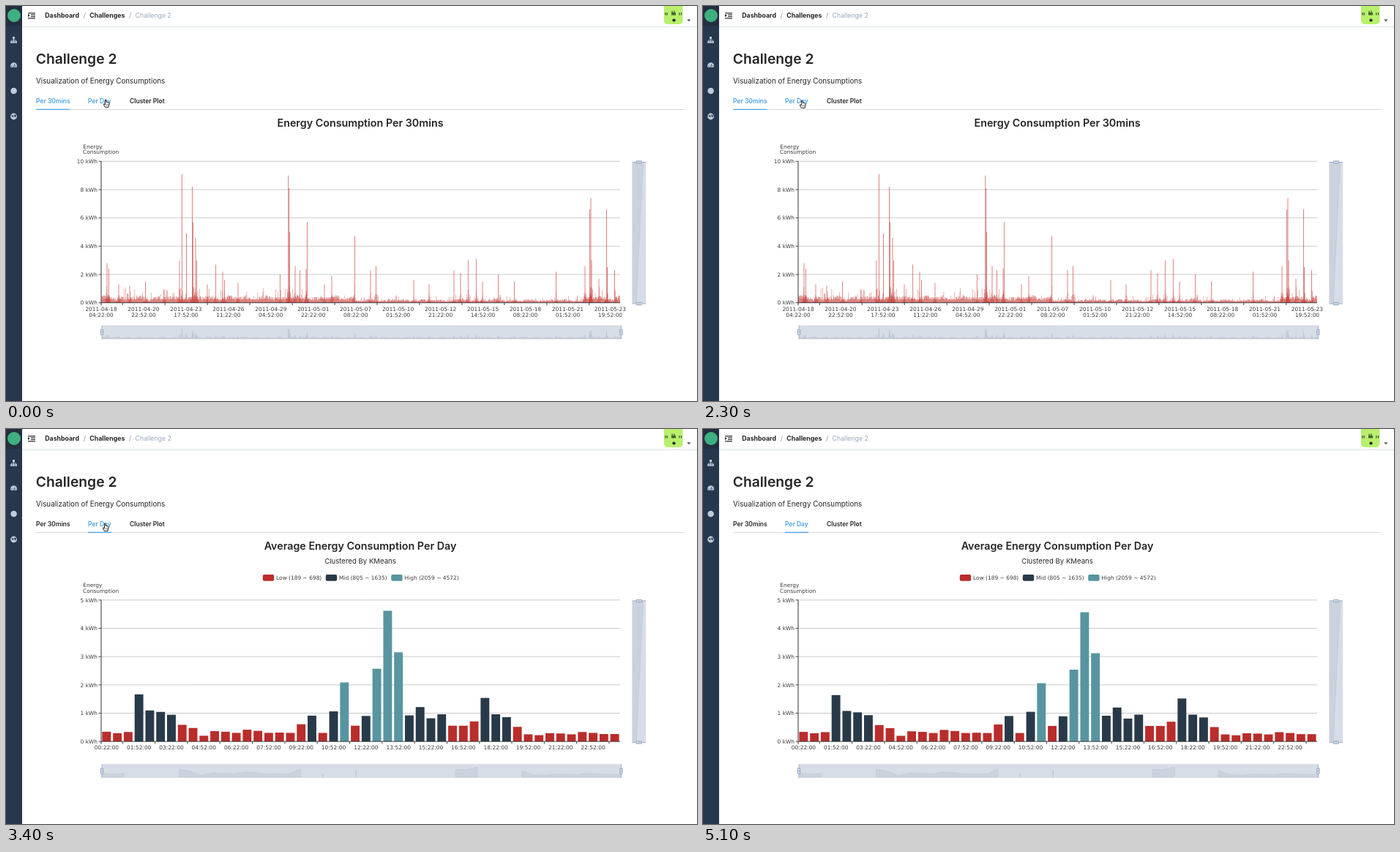
Animation, 944 px wide and 540 px high, one loop 5.2 s. Source, as an HTML page with a canvas:

```html
<!DOCTYPE html>
<html lang="en">
<head>
<meta charset="utf-8">
<title>Energy dashboard</title>
<style>
html, body { margin: 0; width: 100%; height: 100%; overflow: hidden; background: #fff; }
canvas { display: block; width: 944px; height: 540px; }
</style>
</head>
<body>
<canvas id="stage"></canvas>
<script>
const W = 944, H = 540, LOOP = 5200, STEP = 100, SWITCH = 2900;
const UI = 'Inter, sans-serif', CHART = '"DejaVu Sans", sans-serif';
const INK = '#262626', BLUE = '#4ba3e8', ICON = '#bfcbd9';
const LOW = '#b92d2b', MID = '#283a49', HIGH = '#5795a0';
const LEFT = 130, RIGHT = 839;

const canvas = document.getElementById('stage');
const ctx = canvas.getContext('2d');
const dpr = window.devicePixelRatio || 1;
canvas.width = W * dpr;
canvas.height = H * dpr;

// Mean load per half hour, in kWh
const dayLoad = [
  .34, .29, .33, 1.64, 1.08, 1.03, .93, .58, .47, .2, .36, .34,
  .3, .41, .37, .3, .31, .3, .6, .9, .3, 1.05, 2.06, .55,
  .89, 2.54, 4.57, 3.12, .91, 1.2, .81, .95, .55, .55, .7, 1.52,
  .95, .85, .51, .25, .22, .29, .28, .25, .33, .3, .26, .26];

// Position and height of the tallest readings
const peaks = [
  [138, 2.8], [140.3, 2.4], [154, 1.3], [169, 1.2], [190.5, 1.5], [216, .9],
  [237, 3], [240.3, 9.1], [246.5, 4.9], [254.6, 8.2], [255.6, 5.7], [259, 4.6],
  [260.4, 3], [275, 1.3], [286.7, 2.7], [296, 2.2], [298.5, 1.6], [317, 1.4],
  [374.3, 2], [385.8, 9], [386.8, 8.1], [387.6, 5], [395, 2.6], [401.5, 2.3],
  [410, 2.4], [411.5, 5.7], [435, 1.3], [445, 1.9], [476.6, 4.7], [498, 2.3],
  [505.6, 2.6], [557, 1.6], [578, 1.3], [612, 2.3], [621, 2.1], [631.3, 3],
  [642.3, 3.1], [651, 1.5], [672.4, 2], [694.5, 1.5], [751.4, 2.2], [791, 2.6],
  [797.4, 6.6], [799, 7.4], [800, 3], [810, 1.7], [820.4, 6.6], [821.5, 2.5], [831.6, 2.3]];

function seeded(seed) {
  return () => (seed = (seed * 16807) % 2147483647) / 2147483647;
}

// Low background readings with occasional bursts
function makeNoise() {
  const rnd = seeded(4711), out = [];
  for (let x = LEFT + .3; x < RIGHT; x += .45) {
    const level = x < 475 || x > 790 ? 1 : .5;
    const wave = .75 + .25 * Math.sin(x / 5) * Math.sin(x / 17);
    let v = level * wave * (.2 + .4 * rnd());
    if (rnd() < .07) v += level * .75 * rnd();
    out.push([x, v]);
  }
  for (const [px, pv] of peaks)
    for (let d = -3; d <= 3; d += .9)
      out.push([px + d, Math.min(1.5, pv * .45) * rnd() * (1 - Math.abs(d) / 4)]);
  return out;
}
const noise = makeNoise();

function rect(x, y, w, h, fill, r = 0) {
  ctx.fillStyle = fill;
  ctx.beginPath();
  ctx.roundRect(x, y, w, h, r);
  ctx.fill();
}

function disc(x, y, r, fill) {
  ctx.fillStyle = fill;
  ctx.beginPath();
  ctx.arc(x, y, r, 0, 7);
  ctx.fill();
}

function path(points, stroke, width = 1, fill) {
  ctx.beginPath();
  points.forEach(([x, y]) => ctx.lineTo(x, y));
  if (fill) {
    ctx.closePath();
    ctx.fillStyle = fill;
    ctx.fill();
  }
  if (stroke) {
    ctx.strokeStyle = stroke;
    ctx.lineWidth = width;
    ctx.stroke();
  }
}

function text(s, x, y, size, { weight = 400, color = INK, align = 'left', font = UI } = {}) {
  ctx.font = `${weight} ${size}px ${font}`;
  ctx.fillStyle = color;
  ctx.textAlign = align;
  ctx.fillText(s, x, y);
}

const label = (s, x, y, align = 'center') =>
  text(s, x, y, 7.45, { font: CHART, align, color: '#3c3c3c' });

function drawSidebar() {
  rect(0, 0, 22, H, '#27374d');
  rect(0, 0, 22, 27, '#222f40');
  disc(11, 13, 9, '#3fae80');

  path([[10.5, 45], [10.5, 48]], ICON, .9);
  path([[7.5, 49], [7.5, 46.8], [13.7, 46.8], [13.7, 49]], ICON, .8);
  rect(9, 42, 3, 3, ICON);
  for (const x of [6.2, 9.2, 12.3]) rect(x, 48, 2.6, 2.8, ICON);

  ctx.fillStyle = ICON;
  ctx.beginPath();
  ctx.arc(10.6, 81.8, 4.5, Math.PI * .85, Math.PI * 2.15);
  ctx.fill();
  path([[10.6, 83.5], [11.8, 79.5]], '#27374d', .9);
  for (const x of [8, 13.3]) disc(x, 81.8, .6, '#27374d');

  disc(10.6, 116, 4.3, ICON);

  disc(10.6, 151, 4.4, ICON);
  path([[8, 149], [10.5, 150], [10, 152], [8, 151]], null, 0, '#27374d');
  path([[11.5, 148], [14, 149.5], [13, 152.5], [11.5, 151]], null, 0, '#27374d');
}

function drawHeader() {
  rect(22, 27.6, W - 22, 1, '#dcdfe3');
  rect(22, 28.6, W - 22, 1.4, '#f6f7f8');
  for (const y of [9.2, 16.2]) rect(30, y, 10, 1.2, INK);
  for (const y of [11.5, 13.9]) rect(34, y, 6, 1.1, INK);
  path([[30, 11], [32.8, 13], [30, 15]], null, 0, INK);

  text('Dashboard', 53.3, 16, 8.75, { weight: 700 });
  text('Challenges', 114.3, 16, 8.75, { weight: 700 });
  for (const x of [107.3, 169.6]) text('/', x, 16, 9, { color: '#8f959d', align: 'center' });
  text('Challenge 2', 176.6, 16, 8.75, { color: '#97a8be' });

  rect(899, -4, 25.5, 29, '#b8f06c', 5);
  for (const x of [900.3, 902.6, 919.3, 922]) rect(x, 9, 1.2, 3.6, '#3d5130');
  rect(909, 9, 6, 3.5, '#4a6238');
  for (const x of [909.5, 912.5]) rect(x, 6.5, 1.2, 3, '#3d5130');
  disc(912.5, 19.5, 2.1, '#15200f');
  path([[930.3, 18.3], [935.5, 18.3], [932.9, 21.2]], null, 0, '#555');
}

function drawPage(since) {
  text('Challenge 2', 40.7, 78.6, 19.3, { weight: 600 });
  text('Visualization of Energy Consumptions', 41, 105.5, 9.85);

  const day = since >= 0;
  const tab = (s, x, on) => text(s, x, 132.8, 8.5, { weight: 600, color: on ? BLUE : INK });
  tab('Per 30mins', 41, !day);
  tab('Per Day', 112, true);
  tab('Cluster Plot', 169, false);

  rect(41, 141, 886, 1, '#d6d9de');
  const k = Math.min(1, (since + 78) / 300);
  const ease = k < .5 ? 4 * k ** 3 : 1 - 4 * (1 - k) ** 3;
  if (day) rect(41 + 71 * ease, 140.7, 32, 1.4, BLUE);
  else rect(41, 140.7, 46.3, 1.4, BLUE);
}

function drawGrid(top, max, unit) {
  label('Energy', 105.3, top - 17.8, 'left');
  label('Consumption', 105, top - 10.2, 'left');
  for (let i = 0; i <= 5; i++) {
    const y = top + i * 38.68;
    if (i < 5) path([[LEFT, y], [RIGHT, y]], '#c6c6c6', .9);
    path([[126.5, y], [LEFT, y]], '#333', .9);
    label(`${max - i * unit} kWh`, 125, y + 2.7, 'right');
  }
}

function drawAxes(top, gap) {
  const base = top + 193.4;
  path([[LEFT, top], [LEFT, base + 3.5]], '#333');
  path([[LEFT, base], [RIGHT, base]], '#333', .9);
  for (let x = 159.3; x < RIGHT; x += gap) path([[x, base], [x, base + 3.3]], '#333', .9);
}

function handle(x, y, turned) {
  ctx.save();
  ctx.translate(x, y);
  if (turned) ctx.rotate(Math.PI / 2);
  path([[0, -9.3], [0, 9.3]], '#9fb0c7', 1);
  rect(-2.3, -4, 4.6, 8, '#a2b3ca', 1);
  for (const d of [-1.6, 1.6]) rect(-1, d - 1, 2, 2, '#e0e6ef');
  ctx.restore();
}

function drawSliders(top, shadow) {
  const base = top + 193.4, y = base + 31.2;
  rect(855.5, top + 1, 18.7, 193.5, '#d7dde7');
  path([[855.5, top + 1], [870.5, top + 1], [861, base + 1], [855.5, base + 1]], null, 0, '#cad2dd');
  path([[870.5, top + 1], [861, base + 1]], '#bcc6d3', .6);
  handle(864.8, top + 1.2, true);
  handle(864.8, base + 1.3, true);

  rect(131, y, 709.5, 18.3, '#d7dde7');
  shadow(y + 17.6);
  path([[131, y], [840.5, y]], '#cbd3df', .6);
  path([[131, y + 18.3], [840.5, y + 18.3]], '#cbd3df', .6);
  handle(131, y + 9.2);
  handle(840.3, y + 9.2);
}

function drawHalfHours() {
  const top = 212.3, base = top + 193.4;
  text('Energy Consumption Per 30mins', 484, 164.5, 14.3, { weight: 600, align: 'center' });
  drawGrid(top, 10, 2);
  const column = (x, v, w, fill) => rect(x, base - v * 19.34, w, v * 19.34, fill);
  for (const [x, v] of noise) column(x, v, .36, '#c23531');
  for (const [x, v] of peaks) column(x - .35, v, .7, '#c8504d');
  drawAxes(top, 57.95);

  const days = ['04-18', '04-20', '04-23', '04-26', '04-29', '05-01', '05-07',
    '05-10', '05-12', '05-15', '05-18', '05-21', '05-23'];
  const hours = ['04:22', '22:52', '17:52', '11:22', '04:52', '22:22', '08:22',
    '01:52', '21:22', '14:52', '08:22', '01:52', '19:52'];
  days.forEach((d, i) => {
    const x = LEFT + i * 57.95;
    label('2011-' + d, x, 416.8);
    label(hours[i] + ':00', x, 424.6);
  });

  drawSliders(top, bottom => {
    const line = [[131, bottom]];
    for (let x = 131; x < 840; x += 3) line.push([x, bottom - .9 - .5 * Math.sin(x * 1.7)]);
    line.push([840, bottom]);
    path(line, null, 0, '#c3ccd8');
    path(line, '#b7c2d0', .5, '#c3ccd8');
    for (const [x, v] of peaks)
      path([[x - .9, bottom], [x, bottom - 1 - v * 1.4], [x + 1, bottom]], '#b7c2d0', .4, '#c0c9d6');
  });
}

function elastic(k) {
  if (k <= 0) return 0;
  if (k >= 1) return 1;
  return 1 + 2 ** (-10 * k) * Math.sin((k - .1) * Math.PI * 5);
}

const kind = v => v <= .7 ? 0 : v < 2 ? 1 : 2;
const clusters = [
  { name: 'Low (189 ~ 698)', color: LOW, x: 350.8, lead: 58 },
  { name: 'Mid (805 ~ 1635)', color: MID, x: 436.8, lead: 51.5 },
  { name: 'High (2059 ~ 4572)', color: HIGH, x: 526.2, lead: 40.5 }];

function drawDay(since) {
  const top = 233.8, base = top + 193.4, band = (RIGHT - LEFT) / 48;
  text('Average Energy Consumption Per Day', 484, 164.5, 14.3, { weight: 600, align: 'center' });
  text('Clustered By KMeans', 484, 184, 9.6, { align: 'center' });
  for (const c of clusters) {
    rect(c.x, 198.9, 15.4, 8.8, c.color, 2);
    label(c.name, c.x + 18.3, 206, 'left');
  }
  drawGrid(top, 5, 1);
  dayLoad.forEach((v, i) => {
    const c = clusters[kind(v)];
    const h = v * 38.68 * elastic((since + c.lead - i * .47) / 1000);
    rect(LEFT + i * band + 1.4, base - h, 11.9, h, c.color);
  });
  drawAxes(top, band * 3);
  for (let i = 0; i < 16; i++) {
    const m = 22 + i * 90;
    const two = n => String(n).padStart(2, '0');
    label(`${two(Math.floor(m / 60))}:${two(m % 60)}:00`, LEFT + (i * 3 + .5) * band, base + 11.1);
  }

  drawSliders(top, bottom => {
    const px = i => 131 + i * 709.5 / 47;
    for (let i = 0; i < 48; i++) {
      if (kind(dayLoad[i])) continue;
      const start = i, line = [[px(i), bottom]];
      for (; i < 48 && !kind(dayLoad[i]); i++)
        line.push([px(i), bottom - (dayLoad[i] - .1) * 23]);
      line.push([px(i - 1), bottom]);
      if (i - start === 1) path(line, '#b9c3d0', .7);
      else path(line, '#bdc7d4', .5, '#cad2dd');
    }
  });
}

function drawHand(x, y) {
  ctx.save();
  ctx.translate(x, y);
  ctx.lineJoin = 'round';
  path([[-1.6, -4.8], [-.3, -4.8], [.1, -1.8], [3.6, -1], [4.2, .2], [3.6, 3.2],
    [3, 5.4], [-1.6, 5.4], [-3.6, 1.8], [-3.4, .8], [-1.5, 1.7]], '#222', 1, '#fff');
  for (const d of [-.2, 1.2, 2.6]) path([[d, 1], [d, 3.6]], '#444', .5);
  ctx.restore();
}

function drawArrow(x, y) {
  ctx.save();
  ctx.translate(x, y);
  path([[0, 0], [0, 9.6], [2.2, 7.6], [3.7, 11], [5.2, 10.3], [3.8, 7.1], [6.8, 6.9]], '#fff', .8, '#111');
  ctx.restore();
}

function drawPointer(t) {
  if (t < 100) return drawHand(137, 133);
  if (t < 3600) return drawHand(136, 134);
  if (t >= 4300) return;
  const k = (t - 3500) / 400;
  const x = 136 + 43.5 * k, y = 129 - 32 * k ** 1.5;
  if (y > 118) drawHand(x, y);
  else drawArrow(x, y);
}

function draw(t) {
  ctx.setTransform(dpr, 0, 0, dpr, 0, 0);
  rect(0, 0, W, H, '#fff');
  const since = t - SWITCH;
  drawHeader();
  drawSidebar();
  drawPage(since);
  if (since < 0) drawHalfHours();
  else drawDay(since);
  drawPointer(t);
}

let shown = -1;
const began = performance.now();
function tick() {
  const t = (performance.now() - began) % LOOP;
  const step = Math.floor(t / STEP) * STEP;
  if (step !== shown) draw(shown = step);
  requestAnimationFrame(tick);
}
tick();
</script>
</body>
</html>
```
